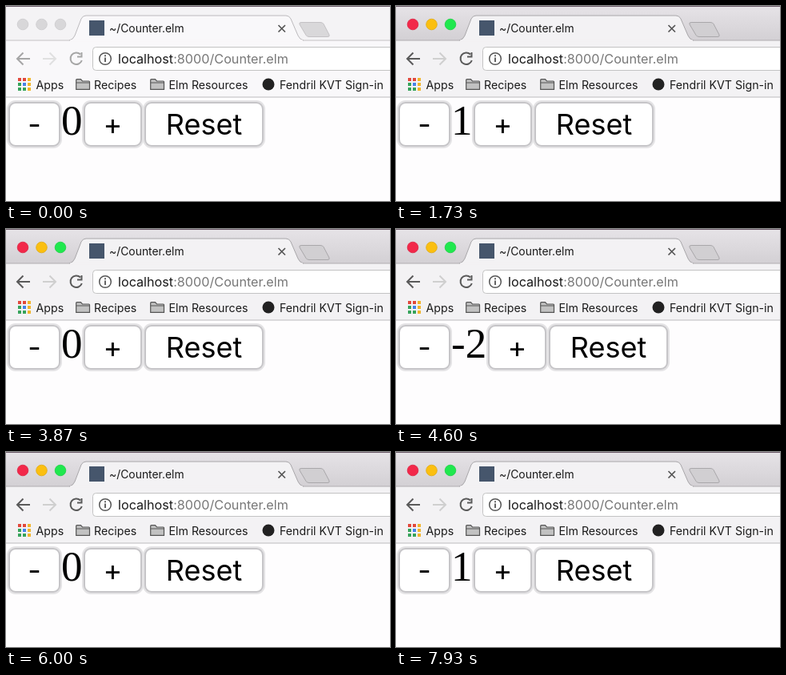
Animation of 480x244 px, one loop 8 s. Source, as an HTML page:

```html
<!DOCTYPE html>
<html lang="en">
<head>
<meta charset="utf-8">
<title>Counter</title>
<style>
  html, body { margin: 0; width: 100%; height: 100%; overflow: hidden; background: #fefdfe; }
  svg { display: block; width: 480px; height: 244px; font-family: Inter, Roboto, sans-serif; }
  .bar { fill: url(#active); }
  .edge { stroke: #b0adb1; }
  .tab { fill: #f3f2f4; stroke: #a9a7aa; }
  .toolbar { fill: #f3f2f4; }
  .plus { fill: #d1cfd2; stroke: #a9a7aa; }
  .icon { stroke: #5a5a5a; }
  .faint { stroke: #cfcfcf; }
  .inactive .bar { fill: #f4f3f5; }
  .inactive .edge { stroke: #c4c2c5; }
  .inactive .tab { fill: #f9f8fa; stroke: #bcbabd; }
  .inactive .toolbar { fill: #f9f8fa; }
  .inactive .plus { fill: #d9d8da; stroke: #c4c2c5; }
  .inactive .lights circle { fill: #d8d7d9; stroke: #cccbcd; }
  .inactive .icon { stroke: #a6a6a6; }
  .inactive .faint { stroke: #e0e0e0; }
  .title { font-size: 13.9px; fill: #1a1a1a; }
  .mark { font-size: 14.2px; fill: #1a1a1a; }
  .url { font-size: 16.2px; fill: #777; }
  .folder { fill: #c2c2c2; stroke: #555; stroke-width: 1.2; }
  .button text { font-size: 36px; text-anchor: middle; fill: #000; }
  .rim { fill: #e4e3e5; }
  .line { fill: #c6c5c8; }
  .face { fill: #fff; }
  .down .rim { fill: #7f9cf0; }
  .down .line { fill: #2a22d0; }
  .down .face { fill: url(#blue); }
  #count { font: 53px "Liberation Serif", "Times New Roman", serif; }
</style>
</head>
<body>
<svg id="window" viewBox="0 0 480 244">
  <defs>
    <linearGradient id="active" x2="0" y2="1">
      <stop stop-color="#e6e3e7"/><stop offset="1" stop-color="#d3d0d4"/>
    </linearGradient>
    <linearGradient id="blue" x2="0" y2="1">
      <stop stop-color="#4a90f4"/><stop offset="1" stop-color="#215ae6"/>
    </linearGradient>
    <path id="folder" d="M.7 13.3V1.7q0-1 1-1H6.500l2 2.300h8q1 0 1 1v9.300zM.7 5H17.500"/>
  </defs>

  <!-- Title bar and tab -->
  <rect class="bar" width="480" height="43"/>
  <rect class="toolbar" y="43" width="480" height="71"/>
  <path d="M0 .5H480" stroke="#6a5a68"/>
  <path class="edge" d="M0 43H480"/>
  <path class="tab" d="M79 43q5-1 7-6L94 16q2-4 6-4H350q4 0 6 4l9 21q2 5 7 6"/>
  <path class="toolbar" d="M80 42.500H371v2H80z"/>
  <path class="plus" d="M369 20.500H393q3 0 4 2L404 36q1 2.500-2 2.500H379q-3 0-4-2L367 23q-1-2.500 2-2.500z"/>
  <g class="lights" stroke-width=".8">
    <circle cx="21" cy="23" r="6.800" fill="#f2284a" stroke="#dc2444"/>
    <circle cx="44.500" cy="23" r="6.800" fill="#fbbf10" stroke="#e0aa12"/>
    <circle cx="68" cy="23" r="6.800" fill="#20e84e" stroke="#1dcf46"/>
  </g>
  <rect x="104" y="18" width="19" height="19" fill="#46566c"/>
  <text class="title" x="129" y="33">~/Counter.elm</text>
  <path d="M340.500 24l8.500 8.500m0-8.500l-8.500 8.500" stroke="#555" stroke-width="1.700"/>

  <!-- Toolbar -->
  <g fill="none" stroke-width="2">
    <path class="icon" d="M30 66H14m7.500-7.500L14 66l7.500 7.500"/>
    <path class="faint" d="M46 66H62m-7.500-7.500L62 66l-7.500 7.500"/>
    <path class="icon" d="M93 60.500a7.300 7.300 0 1 0 1.800 7.500M94.500 58v5.500H89"/>
  </g>
  <rect x="108.500" y="51.500" width="380" height="29" rx="4" fill="#fff" stroke="#c3c3c3"/>
  <circle cx="124" cy="66" r="7.300" fill="none" stroke="#555" stroke-width="1.500"/>
  <path d="M124 64.500V70M124 61.200v2" stroke="#555" stroke-width="1.800"/>
  <text class="url" x="140" y="71.500"><tspan fill="#1a1a1a">localhost</tspan>:8000/Counter.elm</text>

  <!-- Bookmarks -->
  <g id="apps"></g>
  <use href="#folder" class="folder" x="87" y="91"/>
  <use href="#folder" class="folder" x="180" y="91"/>
  <circle cx="328" cy="98" r="7.500" fill="#222"/>
  <g class="mark">
    <text x="37.500" y="103.500">Apps</text>
    <text x="110" y="103.500">Recipes</text>
    <text x="203.500" y="103.500">Elm Resources</text>
    <text x="342" y="103.500">Fendril KVT Sign-in</text>
  </g>
  <path d="M0 114H480" stroke="#bcbabd"/>

  <!-- Counter -->
  <g id="buttons"></g>
  <text id="count" x="69" y="160.500">0</text>
</svg>
<script>
const LOOP = 8000, ACTIVATE = 870, MINUS_WIDTH = 18;
const $ = id => document.getElementById(id);

const appColors = ["#e2483c", "#e2483c", "#f0b52c", "#35a35a", "#4683ea", "#f0b52c", "#35a35a", "#35a35a", "#f0b52c"];
$("apps").innerHTML = appColors.map((color, i) =>
  `<rect x="${15 + i % 3 * 6}" y="${90 + Math.floor(i / 3) * 6}" width="4" height="4" fill="${color}"/>`).join("");

const box = (name, inset, width, height) =>
  `<rect class="${name}" x="${inset}" y="${inset}" width="${width - 2 * inset}" height="${height - 2 * inset}" rx="${11 - inset}"/>`;

const buttons = [
  { label: "-", x: 1, width: 69 },
  { label: "+", x: 95, width: 77 },
  { label: "Reset", x: 171, width: 153 }
];
$("buttons").innerHTML = buttons.map(({ label, width }) =>
  `<g class="button">${box("rim", 0, width, 60)}${box("line", 2, width, 60)}${box("face", 4, width, 60)
  }<text x="${width / 2}" y="42.500">${label}</text></g>`).join("");
const nodes = [...$("buttons").children];

// Button, time pressed, time released, time the new count appears
const clicks = [
  ["+", 1270, 1400, 1470], ["+", 1800, 1930, 2000], ["+", 2270, 2330, 2400],
  ["-", 2600, 2670, 2730], ["-", 2870, 2930, 3000], ["-", 3130, 3200, 3330],
  ["-", 4000, 4070, 4130], ["-", 4270, 4330, 4400], ["-", 4530, 4600, 4670],
  ["+", 4930, 5070, 5130], ["+", 5330, 5470, 5530], ["+", 5730, 5870, 5930],
  ["Reset", 6530, 6670, 6730], ["+", 7000, 7130, 7270]
];
const update = { "+": n => n + 1, "-": n => n - 1, "Reset": () => 0 };

function draw(now) {
  const t = now % LOOP;
  let count = 0, held = "";
  for (const [label, press, release, show] of clicks) {
    if (t >= press && t < release) held = label;
    if (t >= show) count = update[label](count);
  }
  $("window").classList.toggle("inactive", t < ACTIVATE);
  $("count").textContent = count;
  buttons.forEach(({ label, x }, i) => {
    const shift = i && count < 0 ? MINUS_WIDTH : 0;
    nodes[i].setAttribute("transform", `translate(${x + shift} 118)`);
    nodes[i].classList.toggle("down", label === held);
  });
  requestAnimationFrame(() => draw(performance.now()));
}
draw(performance.now());
</script>
</body>
</html>
```
